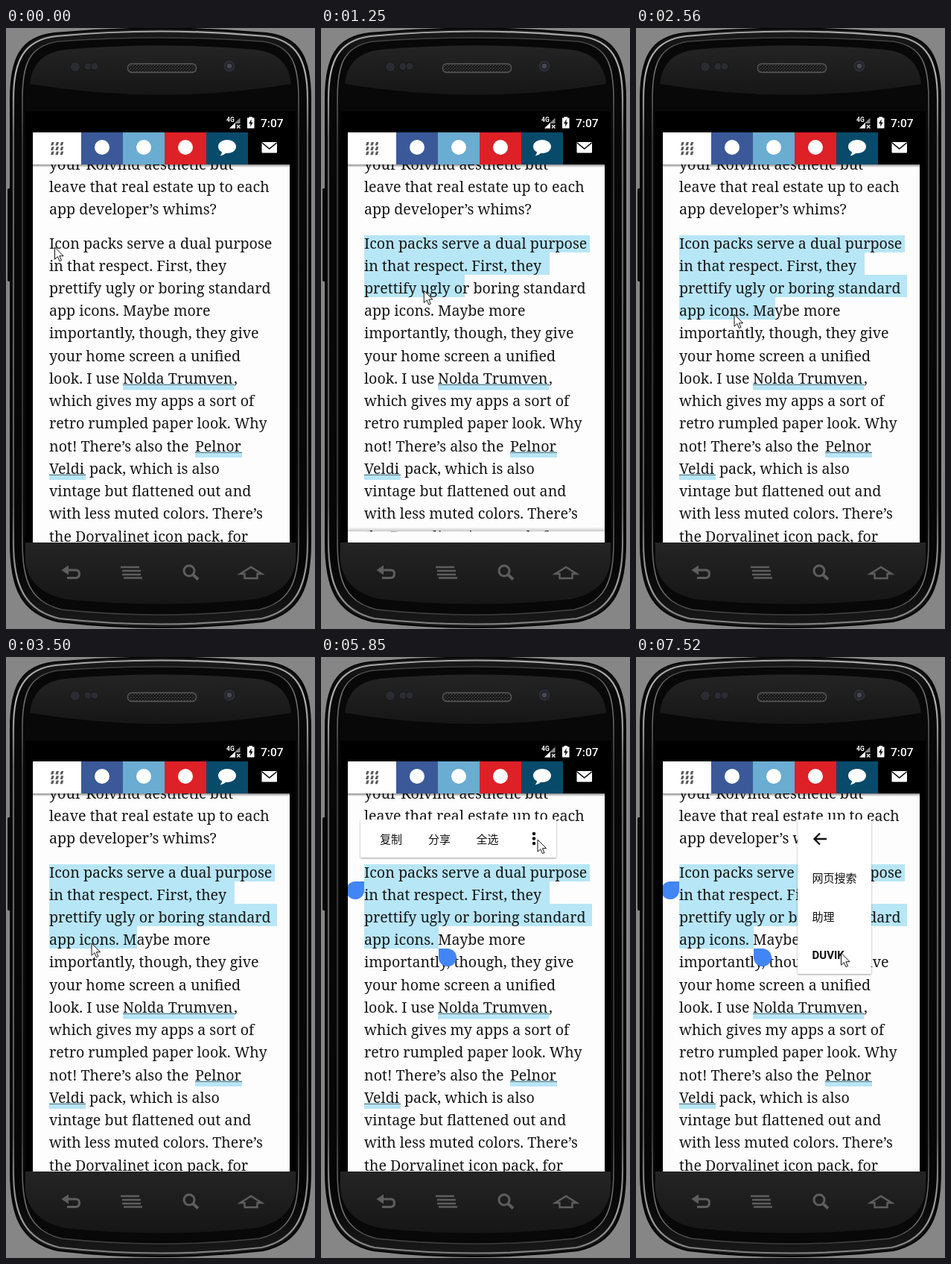
Animation, 415 px wide and 806 px high, one loop 8 s. Source, as an HTML page:

```html
<!DOCTYPE html>
<html lang="en">
<head>
<meta charset="utf-8">
<title>Text selection on a phone</title>
<style>
html, body { margin: 0; width: 100%; height: 100%; overflow: hidden; background: #868686; }
svg { display: block; width: 100vw; height: 100vh; }
.page { font: 19.65px "Noto Serif", serif; fill: #161616; }
.ui { font: 500 15px Roboto, "Noto Sans CJK SC", "Noto Sans CJK", sans-serif; fill: #111; }
.card { fill: #fff; filter: drop-shadow(0 1px 1.2px rgba(0,0,0,.38)); }
.nav { fill: none; stroke: #5e5e5e; stroke-width: 3; }
</style>
</head>
<body>
<svg viewBox="0 0 415 806" preserveAspectRatio="none">
  <defs>
    <linearGradient id="shell" x2="0" y2="1">
      <stop offset="0" stop-color="#1c1c1c"/><stop offset=".06" stop-color="#080808"/>
      <stop offset=".9" stop-color="#060606"/><stop offset="1" stop-color="#1a1a1a"/>
    </linearGradient>
    <linearGradient id="rim" x2="0" y2="1">
      <stop offset="0" stop-color="#a8a8a8"/><stop offset=".07" stop-color="#b4b4b4"/>
      <stop offset=".18" stop-color="#666"/><stop offset=".8" stop-color="#585858"/>
      <stop offset=".93" stop-color="#a2a2a2"/><stop offset="1" stop-color="#808080"/>
    </linearGradient>
    <linearGradient id="edge" x2="0" y2="1">
      <stop offset="0" stop-color="#3c3c3c"/><stop offset=".05" stop-color="#787878"/>
      <stop offset=".18" stop-color="#444"/><stop offset=".8" stop-color="#444"/>
      <stop offset=".95" stop-color="#7c7c7c"/><stop offset="1" stop-color="#3c3c3c"/>
    </linearGradient>
    <linearGradient id="glow" x2="0" y2="1">
      <stop offset="0" stop-color="#242424"/><stop offset="1" stop-color="#161616"/>
    </linearGradient>
    <linearGradient id="fall" x2="0" y2="1">
      <stop offset="0" stop-color="#000" stop-opacity=".45"/><stop offset="1" stop-color="#000" stop-opacity="0"/>
    </linearGradient>
    <linearGradient id="rise" x2="0" y2="1">
      <stop offset="0" stop-color="#000" stop-opacity="0"/><stop offset="1" stop-color="#000" stop-opacity=".22"/>
    </linearGradient>
    <pattern id="mesh" width="4" height="4" patternUnits="userSpaceOnUse">
      <rect width="4" height="4" fill="#3b3b3b"/>
      <path d="M0 0L4 4M4 0L0 4" stroke="#111" stroke-width="1.2"/>
    </pattern>
    <clipPath id="view"><rect x="36" y="183" width="345" height="507"/></clipPath>
    <clipPath id="cardClip"><rect id="cardMask" y="218"/></clipPath>
  </defs>

  <!-- phone body -->
  <rect width="415" height="806" fill="#868686"/>
  <rect x="2" y="215" width="8" height="125" rx="2" fill="#0b0b0b"/>
  <path d="M6 95C6 40 20 12 65 7Q207 -6 350 7C395 12 409 40 409 95V690C409 750 395 785 345 796Q207 812 70 796C20 785 6 750 6 690Z" fill="url(#shell)" stroke="#050505" stroke-width="2"/>
  <path d="M10 95C10 44 24 16 67 11Q207 -2 348 11C391 16 405 44 405 95V690C405 746 391 781 343 792Q207 807 72 792C24 781 10 746 10 690Z" fill="none" stroke="url(#rim)" stroke-width="2.2"/>
  <path d="M22 95C22 50 30 24 70 18Q207 8 345 18C385 24 393 50 393 95V690C393 740 383 770 340 780Q207 794 75 780C32 770 22 740 22 690Z" fill="#080808" stroke="url(#edge)" stroke-width="1.5"/>
  <path d="M32 75Q36 34 80 29Q207 18 335 29Q379 34 383 75Q207 104 32 75Z" fill="url(#glow)"/>
  <path d="M26 690H389V715Q384 756 335 766Q207 779 80 766Q31 756 26 715Z" fill="url(#glow)"/>
  <rect x="26" y="112" width="363" height="578" fill="#000"/>
  <rect x="163.500" y="48" width="92" height="11.500" rx="5" fill="url(#mesh)" stroke="#595959" stroke-width="1.3"/>
  <g fill="#2b2b32" stroke="#17171b">
    <circle cx="93" cy="52" r="6.500"/><circle cx="110" cy="51.500" r="5"/><circle cx="119" cy="51.500" r="5"/>
    <circle cx="300" cy="51" r="8.500"/><circle cx="300" cy="51" r="4" fill="#484855"/>
  </g>
  <g class="nav">
    <path d="M83 727H94Q98.500 727 98.500 732T94 737.500H82"/>
    <path d="M84 720.500V733.500L74.500 727Z" fill="#5e5e5e" stroke="none"/>
    <path d="M154 723H179M156 728H181M156 733H181M158 737.500H183" stroke-width="2.4"/>
    <circle cx="246" cy="728" r="7"/><path d="M251 733L258 739.500" stroke-width="4"/>
    <path d="M314.500 732L329 723L343.500 732H337.500V738H320.500V732Z" stroke-width="2.4"/>
  </g>

  <!-- status bar -->
  <g fill="#fff">
    <text x="296" y="126" font-family="Roboto, sans-serif" font-size="8.500" font-weight="700">4G</text>
    <path d="M300 134.500L314.500 120.500V128H308V134.500Z" fill="#8b8b8b"/>
    <path d="M300 134.500L308 127V134.500Z"/>
    <path d="M310 130L314.500 134.500M314.500 130L310 134.500" stroke="#fff" stroke-width="1.3"/>
    <path d="M324 120.500H326.500V119H331V120.500H333.500V134.500H324Z"/>
    <path d="M329.800 122L326 128.300H328.500L327.800 132.800L331.700 126.500H329.200Z" fill="#000"/>
    <text x="342" y="133" font-family="Roboto, sans-serif" font-size="15.500" font-weight="500">7:07</text>
  </g>

  <!-- page -->
  <g clip-path="url(#view)">
    <rect x="36" y="183" width="345" height="507" fill="#fdfdfd"/>
    <g id="marks" fill="#b7e6f7"></g>
    <path d="M157 477H306.500V485.500H157ZM254 568H317V576H254ZM58 598H107V606H58Z" fill="#b7e6f7"/>
    <path d="M157 478.500H306.500M254 569.500H317M58 599.500H107" stroke="#555" stroke-width=".8"/>
    <g id="lines" class="page"></g>
    <g id="handles" fill="#4285f4">
      <path d="M158 391H170A12 12 0 1 1 158 403Z"/>
      <path d="M58 301H46A12 12 0 1 0 58 313Z"/>
    </g>
    <g id="sheet">
      <rect x="36" y="624" width="345" height="6" fill="url(#rise)"/>
      <rect x="36" y="630" width="345" height="62" fill="#fdfdfd"/>
      <circle cx="68" cy="660" r="13" fill="#4285f4"/>
      <text x="102" y="668" font-family="Roboto, sans-serif" font-size="19" fill="#222">Icon</text>
      <path d="M349.500 663L355.500 657L361.500 663" fill="none" stroke="#777" stroke-width="1.6"/>
    </g>
  </g>

  <!-- share bar -->
  <g id="tiles"></g>
  <g id="grid" fill="#5a5a5a"></g>
  <g fill="#fff">
    <circle cx="129" cy="160" r="10"/><circle cx="185" cy="160" r="10"/><circle cx="241" cy="160" r="10"/>
    <path d="M297 150C304 150 309 154 309 159S304 168 297 168L295 168Q292 171 287.500 171.500Q290 169 290 166.300Q285 164 285 159C285 154 290 150 297 150Z"/>
    <rect x="343.500" y="153" width="20.500" height="14.500" rx="1"/>
    <path d="M344 154L353.700 162L363.500 154" fill="none" stroke="#000" stroke-width="1.6"/>
  </g>
  <rect x="36" y="183" width="345" height="4" fill="url(#fall)"/>

  <!-- selection menu -->
  <g id="menu" class="ui">
    <rect id="card" class="card" y="218" rx="1.500"/>
    <g clip-path="url(#cardClip)">
      <g id="actions">
        <text x="79" y="249.500">复制</text><text x="144" y="249.500">分享</text><text x="208.500" y="249.500">全选</text>
      </g>
      <circle id="ripple" cy="244" r="21" fill="#efefef"/>
      <g id="dots"><circle cx="286" cy="237" r="2.300"/><circle cx="286" cy="243.500" r="2.300"/><circle cx="286" cy="250" r="2.300"/></g>
      <path id="arrow" d="M9 0H-7M0 -7.500L-7.500 0L0 7.500" fill="none" stroke="#111" stroke-width="2.300"/>
      <g id="more">
        <text x="236.500" y="301.500">网页搜索</text><text x="236.500" y="353.500">助理</text>
        <text x="236.500" y="405" font-weight="700">DUVIK</text>
      </g>
    </g>
  </g>
  <path id="cursor" d="M0 0V16.200L3.900 12.600L6.500 18.600L9 17.500L6.400 11.700H11.600Z" fill="#fff" stroke="#111"/>
</svg>
<script>
const $ = id => document.getElementById(id);
const LOOP = 8000;

const rect = (x, y, w, h, fill) =>
  `<rect x="${x}" y="${y}" width="${w}" height="${h}"${fill ? ` fill="${fill}"` : ""}/>`;
const at = (x, text) => `<tspan x="${x}">${text}</tspan>`;

const intro = ["your Kolvind aesthetic but", "leave that real estate up to each", "app developer’s whims?"];
const body = ["Icon packs serve a dual purpose", "in that respect. First, they", "prettify ugly or boring standard",
  "app icons. Maybe more", "importantly, though, they give", "your home screen a unified",
  "look. I use " + at(157, "Nolda Trumven") + at(306, ","), "which gives my apps a sort of",
  "retro rumpled paper look. Why", "not! There’s also the " + at(254, "Pelnor"),
  "Veldi" + at(112, "pack, which is also"), "vintage but flattened out and",
  "with less muted colors. There’s", "the Dorvalinet icon pack, for"];
const paragraph = (rows, y) =>
  rows.map((row, i) => `<text x="58" y="${(y + i * 30.23).toFixed(1)}">${row}</text>`).join("");
$("lines").innerHTML = paragraph(intro, 189.8) + paragraph(body, 295.5);

$("tiles").innerHTML = rect(36, 140, 65, 43, "#fff") +
  ["#3b5998", "#6aacd2", "#de2027", "#084a6a", "#000"].map((c, i) => rect(101 + 56 * i, 140, 56, 43, c)).join("");
$("grid").innerHTML = Array.from({ length: 9 }, (_, i) =>
  `<path d="M${60 + i % 3 * 6.3} ${157.6 + Math.floor(i / 3) * 6.3}l1.5 -4.6h3.2l-1.5 4.6z"/>`).join("");

// The screen refreshes in bursts: start, end, number of steps
const bursts = [[430, 1390, 8], [1510, 2410, 8], [2560, 3220, 6], [3500, 3800, 3],
  [4330, 5300, 8], [5450, 5850, 4], [6280, 6580, 3], [6860, 7520, 6]];

function snap(t) {
  let time = 0;
  for (const [start, end, steps] of bursts) {
    if (t < start) break;
    const gap = (end - start) / (steps - 1);
    time = start + gap * Math.min(steps - 1, Math.floor((t - start) / gap + 1e-6));
  }
  return time;
}

// Linear track through [time, ...values]
function track(keys, t) {
  const next = keys.findIndex(k => k[0] > t);
  if (next === 0) return keys[0].slice(1);
  if (next < 0) return keys[keys.length - 1].slice(1);
  const a = keys[next - 1], b = keys[next], p = (t - a[0]) / (b[0] - a[0]);
  return a.slice(1).map((v, i) => v + (b[i + 1] - v) * p);
}

const cursorPath = [[567, 65.5, 294], [841, 99, 315], [1253, 158, 371], [1390, 169, 384], [1767, 158, 384],
  [2410, 135.5, 384], [3220, 116.5, 384], [3500, 115, 384], [3800, 107.5, 384], [4460, 107.5, 384],
  [5023, 227, 298], [5300, 279.5, 267], [5850, 291, 245], [6580, 291, 245], [7250, 279, 418], [7520, 275.5, 397]];
const sheetPath = [[430, 68], [704, 0], [841, 0], [1253, 68]];
const unfoldPath = [[6280, 0], [6430, .65], [6580, 1]];
const lineEnds = [361, 307, 364];
// Cursor x from which the selection reaches each letter edge
const letterEdges = [[164, 222], [148, 211], [138, 198], [119, 187], [109, 176], [0, 158]];

function selection(t, x) {
  if (t < 430) return null;
  if (t < 970) return [0, 98];
  if (t < 1110) return [1, 173];
  if (t < 1250) return [2, 193];
  return [3, letterEdges.find(e => x >= e[0])[1]];
}

function drawSelection(sel) {
  let out = "";
  if (sel) for (let i = 0; i <= sel[0]; i++) {
    const end = i < sel[0] ? lineEnds[i] : sel[1];
    out += i ? rect(58, 271 + 30 * i, end - 58, 30) : rect(58, 278, end - 58, 23);
  }
  $("marks").innerHTML = out;
}

const show = (id, opacity) => $(id).setAttribute("opacity", Number(opacity));

function drawMenu(t) {
  const [p] = track(unfoldPath, t);
  const early = t > 560 && t < 970, late = t >= 4330;
  const fade = early ? (t < 700 ? .6 : 1) : late ? (t < 4460 ? .6 : 1) : 0;
  for (const id of ["card", "cardMask"]) {
    $(id).setAttribute("x", 53 + 164 * p);
    $(id).setAttribute("width", 263 - 164 * p);
    $(id).setAttribute("height", 51 + 156 * p);
  }
  const iconX = p < 1 ? 286 - 43 * p : 247;
  $("ripple").setAttribute("cx", iconX);
  $("arrow").setAttribute("transform", `translate(${iconX} 244)`);
  show("menu", fade);
  show("actions", Math.max(0, 1 - 1.35 * p));
  show("ripple", t >= 6280 && p < 1);
  show("dots", p < .3);
  show("arrow", p >= .3);
  show("more", p > 0);
}

function draw(ms) {
  const t = snap(ms);
  const dragTime = Math.min(t, 3800);
  const [x, y] = track(cursorPath, t);
  $("cursor").setAttribute("transform", `translate(${x.toFixed(1)} ${y.toFixed(1)})`);
  drawSelection(selection(dragTime, track(cursorPath, dragTime)[0]));
  $("sheet").setAttribute("transform", `translate(0 ${track(sheetPath, t)[0]})`);
  show("handles", t >= 4330);
  drawMenu(t);
}

const begin = performance.now();
function tick() {
  draw((performance.now() - begin) % LOOP);
  requestAnimationFrame(tick);
}
tick();
</script>
</body>
</html>
```
